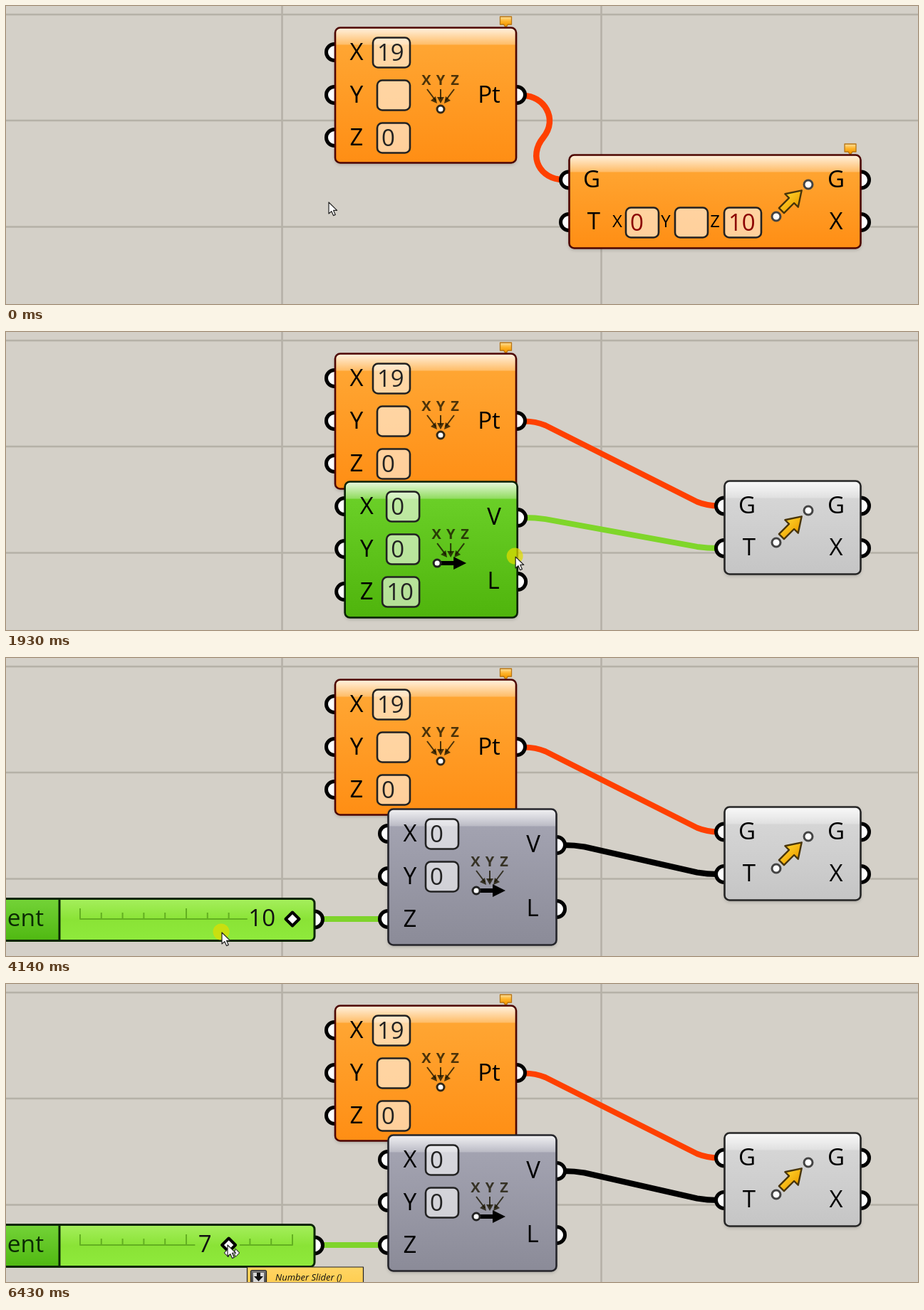
An HTML page with a canvas for the animation above (6500 ms loop, 1280 by 419 pixels).

```html
<!DOCTYPE html>
<html lang="en">
<head>
<meta charset="utf-8">
<title>Extracting a parameter into a slider</title>
<style>
html, body { margin: 0; width: 100%; height: 100%; overflow: hidden; background: #d4d0c8; }
canvas { display: block; }
</style>
</head>
<body>
<canvas id="stage" width="1280" height="419"></canvas>
<script>
const ctx = document.getElementById('stage').getContext('2d');
const LOOP = 6500, FONT = '"Open Sans", "Noto Sans", sans-serif';
const EXTRACT_VECTOR = 750, DRAG_VECTOR = [1440, 2130], EXTRACT_SLIDER = 3180,
      DRAG_SLIDER = [3600, 4200], DRAG_KNOB = [4750, 5900], TOOLTIP = 6430;

// Body gradient from top to bottom, then the outline
const SKINS = {
  warn:   ['#ffa937', '#ff8e14', '#4d0500'],
  green:  ['#6ed32b', '#4fb40c', '#082004'],
  grey:   ['#d9d9d9', '#c5c5c5', '#262626'],
  purple: ['#a6a6b4', '#8b8b98', '#25252b']
};

// Pointer path: time, x, y
const POINTER = [
  [0, 453, 276], [70, 453, 276], [620, 830, 303], [780, 830, 303], [1370, 580, 312],
  [1440, 580, 312], [1720, 600, 312], [2060, 770, 318], [2240, 770, 318], [2400, 577, 157],
  [2500, 577, 157], [3030, 566, 366], [3180, 560, 368], [3390, 485, 382], [3560, 467, 386],
  [3600, 467, 386], [4080, 303, 386], [4240, 303, 386], [4600, 403, 368], [4750, 403, 368],
  [5250, 215, 368], [5440, 255, 368], [5870, 311, 367], [6500, 311, 367]
];

const within = (t, [a, b]) => t >= a && t < b;

function pointerAt(t) {
  const i = POINTER.findIndex(k => k[0] > t);
  const [t0, x0, y0] = POINTER[i - 1], [t1, x1, y1] = POINTER[i];
  const p = (t - t0) / (t1 - t0), e = p * p * (3 - 2 * p);
  return { x: x0 + (x1 - x0) * e, y: y0 + (y1 - y0) * e };
}

function text(s, x, y, size = 33, color = '#000', align = 'center', style = '') {
  ctx.font = `${style} ${size}px ${FONT}`;
  ctx.textAlign = align;
  ctx.fillStyle = color;
  ctx.fillText(s, x, y);
}

function shade(y, h, ...colors) {
  const g = ctx.createLinearGradient(0, y, 0, y + h);
  colors.forEach((c, i) => g.addColorStop(i / (colors.length - 1), c));
  return g;
}

function stroke(path, color, width) {
  ctx.strokeStyle = color;
  ctx.lineWidth = width;
  ctx.lineJoin = 'round';
  ctx.stroke(path);
}

function rounded(x, y, w, h, r) {
  const p = new Path2D();
  p.roundRect(x, y, w, h, r);
  return p;
}

function dot(x, y, r, fill, line, width) {
  const p = new Path2D();
  p.arc(x, y, r, 0, 7);
  ctx.fillStyle = fill;
  ctx.fill(p);
  if (line) stroke(p, line, width);
}

const grip = (x, y) => dot(x, y, 11.5, '#fff', '#000', 5);

function body(x, y, w, h, skin) {
  const [top, bottom, line] = SKINS[skin], p = rounded(x, y, w, h, 7);
  ctx.save();
  ctx.shadowColor = 'rgba(0,0,0,.25)';
  ctx.shadowBlur = 5;
  ctx.shadowOffsetY = 2;
  ctx.fillStyle = shade(y, h, top, bottom);
  ctx.fill(p);
  ctx.restore();
  ctx.save();
  ctx.clip(p);
  ctx.fillStyle = shade(y, 24, 'rgba(255,255,255,.85)', 'rgba(255,255,255,.25)');
  ctx.fillRect(x, y, w, 24);
  ctx.restore();
  stroke(p, line, 2.6);
}

// Value box whose right edge is fixed
function valueBox(right, y, value, color = '#222') {
  const w = value.length > 1 ? 52 : 46, p = rounded(right - w, y - 21, w, 42, 7);
  ctx.fillStyle = 'rgba(255,255,255,.57)';
  ctx.fill(p);
  stroke(p, '#222', 2.6);
  text(value, right - w + 6, y + 11, 33, color, 'left');
}

function balloon(x, y) {
  const p = new Path2D(`M${x - 8} ${y - 7}h16v11h-5l-3 4l-3-4h-5z`);
  ctx.fillStyle = shade(y - 7, 12, '#ffe2a0', '#ffb52e', '#f59a00');
  ctx.fill(p);
  stroke(p, '#b87514', 1.3);
}

function xyzIcon(x, y, vector) {
  const ink = 'rgba(25,20,0,.78)';
  ['X', 'Y', 'Z'].forEach((c, i) => text(c, x + (i - 1) * 20, y + 7, 20, ink, 'center', 'bold'));
  stroke(new Path2D(`M${x - 19} ${y + 13}l12 16M${x} ${y + 13}v14M${x + 19} ${y + 13}l-12 16`), ink, 2);
  ctx.fillStyle = ink;
  ctx.fill(new Path2D(`M${x - 5} ${y + 33}l-9-4l7-6zM${x} ${y + 33}l-5-9h10zM${x + 5} ${y + 33}l9-4l-7-6z`));
  if (!vector) return dot(x, y + 41, 5, '#fff', '#332818', 3);
  ctx.fillStyle = '#000';
  ctx.fill(new Path2D(`M${x - 16} ${y + 38}h20v-6l18 9l-18 9v-6h-20z`));
  dot(x - 19, y + 41, 5, '#fff', '#222', 3);
}

function moveIcon() {
  ctx.save();
  ctx.translate(1087, 289);
  ctx.rotate(-Math.PI / 4);
  const p = new Path2D('M2-5h20v-8l20 13l-20 13v-8h-20z');
  ctx.fillStyle = shade(-12, 24, '#ffd12a', '#eda000');
  ctx.fill(p);
  stroke(p, '#49350b', 2.4);
  ctx.restore();
  dot(1081, 296, 6, '#fff', '#444', 3);
  dot(1126, 251, 6, '#fff', '#444', 3);
}

function wire(x0, y0, x1, y1, color) {
  const slope = (y1 - y0) / (x1 - x0), bend = 22 * slope;
  stroke(new Path2D(`M${x0} ${y0}Q${x0 + 16} ${y0} ${x0 + 30} ${y0 + bend * .6}` +
    `L${x1 - 30} ${y1 - bend * .6}Q${x1 - 16} ${y1} ${x1} ${y1}`), color, 8);
}

function pointComponent() {
  [65, 125, 185].forEach(y => grip(461, y));
  grip(717, 125);
  balloon(701.5, 22);
  body(462, 30.5, 254, 190, 'warn');
  ['X', 'Y', 'Z'].forEach((c, i) => {
    const y = 65 + i * 60;
    text(c, 492, y + 11);
    valueBox(567, y + .5, ['19', '', '0'][i]);
  });
  xyzIcon(610, 104, false);
  text('Pt', 678, 136);
}

function moveComponent(wide) {
  const x = wide ? 790 : 1008;
  [244.5, 304].forEach(y => { grip(x, y); grip(1200, y); });
  if (wide) balloon(1185, 201);
  body(x + .5, 209.5, 1199 - x, 131, wide ? 'warn' : 'grey');
  text('G', x + 32, 255);
  text('T', x + 35, 314);
  if (wide) {
    [['X', 858, 916, '0'], ['Y', 926, 985, ''], ['Z', 995, 1060, '10']].forEach(([c, cx, right, v]) => {
      text(c, cx, 311, 24);
      valueBox(right, 304.5, v, '#8b0000');
    });
  }
  moveIcon();
  text('G', 1165, 255);
  text('X', 1165, 314);
}

function vectorComponent(right, y, skin, linked) {
  const x = right - (linked ? 237 : 243);
  [35, 95, 155].forEach(d => grip(x, y + d));
  [51, 141].forEach(d => grip(right, y + d));
  body(x + .5, y + .5, right - x - 1, 191, skin);
  ['X', 'Y', 'Z'].forEach((c, i) => {
    const row = y + 35 + i * 60;
    text(c, x + 31, row + 10.5);
    if (i < 2 || !linked) valueBox(right - 138, row + .5, i < 2 ? '0' : '10');
  });
  xyzIcon(right - 94, y + 74, true);
  text('V', right - 33, y + 61);
  text('L', right - 34, y + 151);
}

function slider(right, value, selected, held) {
  const left = right - 613, split = right - 358, zero = right - 329, step = 29.8;
  const knob = zero + value * step, line = selected ? '#0a2605' : '#1c1c1c';
  grip(right, 367.5);
  const p = rounded(left, 338.5, 613, 59, 6);
  ctx.save();
  ctx.clip(p);
  ctx.fillStyle = selected ? shade(338, 60, '#74d338', '#4fb811') : shade(338, 60, '#b8b8c6', '#9292a2');
  ctx.fillRect(left, 338, 613, 60);
  ctx.fillStyle = selected ? shade(338, 60, '#a6ef5e', '#8ae336', '#8fea3c') : shade(338, 60, '#f0f0f0', '#d0d0d0', '#c8c8c8');
  ctx.fillRect(split, 338, 358, 60);
  ctx.restore();
  stroke(p, line, 3);
  stroke(new Path2D(`M${split} 338v60`), line, 3);
  text('Z component', right - 380, 377, 33.5, selected ? '#0b2a04' : '#111', 'right');

  // The scale leaves a gap around the number and the knob
  const gap = knob - (value > 9 ? 64 : 48), rule = new Path2D();
  if (gap > zero) rule.rect(zero, 367, gap - zero, .01);
  if (knob + 16 < zero + 10 * step) rule.rect(knob + 16, 367, zero + 10 * step - knob - 16, .01);
  for (let i = 0; i <= 10; i++) {
    const x = zero + i * step;
    if (x < gap || x > knob + 16) {
      rule.moveTo(x, 367);
      rule.lineTo(x, i % 5 ? 358 : 352);
    }
  }
  stroke(rule, selected ? '#63b021' : '#a3a3a3', 2);
  text(value, knob - 24, 377, 33, '#111', 'right');
  const diamond = new Path2D(`M${knob} 357.5l9.5 9.5l-9.5 9.5l-9.5-9.5z`);
  ctx.fillStyle = held ? '#e6d65c' : '#fff';
  ctx.fill(diamond);
  stroke(diamond, held ? '#4b3a00' : '#000', 4);
}

function sliderWire(right) {
  const color = '#7fd42c', overlap = right - 521;
  if (overlap <= 0) return stroke(new Path2D(`M${right + 10} 367H528`), color, 8);
  const r = overlap * .84;
  const loop = new Path2D();
  loop.arc(530, 367 + r * 1.13, r, 0, 7);
  stroke(loop, color, 8);
}

function tooltip() {
  const p = rounded(338.5, 398, 163, 40, 0);
  ctx.fillStyle = shade(398, 30, '#ffd564', '#ffcb4a');
  ctx.fill(p);
  stroke(p, '#222', 1.2);
  const icon = rounded(343.5, 402.5, 22, 22, 2);
  ctx.fillStyle = shade(402, 22, '#777', '#444');
  ctx.fill(icon);
  stroke(icon, '#222', 1.2);
  ctx.fillStyle = '#d8d8d8';
  ctx.fillRect(347, 406, 15, 14);
  ctx.fillStyle = '#111';
  ctx.fill(new Path2D('M352 406h5v5h4l-6.5 7l-6.5-7h4z'));
  text('Number Slider ()', 378, 417, 13, '#111', 'left', 'italic');
}

function pointer({ x, y }, pressed, sliding) {
  if (pressed && !sliding) dot(x - 1, y - 1, 11.5, 'rgba(225,220,0,.72)');
  ctx.save();
  ctx.translate(x, y);
  ctx.fillStyle = '#fff';
  if (sliding) {
    const arrows = new Path2D('M-4 11l5-5v3h10v-3l5 5l-5 5v-3h-10v3z');
    stroke(arrows, '#333', 2);
    ctx.fill(arrows);
  }
  const p = new Path2D('M0 0v16l3.8-3.4l2.7 6l2.8-1.2l-2.7-6h5z');
  ctx.fill(p);
  stroke(p, '#222', 1.2);
  ctx.restore();
}

function draw(t) {
  const at = pointerAt(t);
  const extracted = t >= EXTRACT_VECTOR, linked = t >= EXTRACT_SLIDER, picked = t >= DRAG_SLIDER[0];

  ctx.fillStyle = '#d4d0c8';
  ctx.fillRect(0, 0, 1280, 419);
  stroke(new Path2D('M387.5 0V419M835.5 0V419M0 12H1280M0 161H1280M0 310.5H1280'), 'rgba(70,65,50,.22)', 2.5);

  // The vector component follows the pointer while it is dragged
  const grab = pointerAt(Math.min(Math.max(t, DRAG_VECTOR[0]), DRAG_VECTOR[1]));
  const right = grab.x + 3, top = grab.y - 106;
  const sliderAt = pointerAt(Math.min(Math.max(t, DRAG_SLIDER[0]), DRAG_SLIDER[1]));
  const sliderRight = sliderAt.x + 130;

  if (extracted) {
    wire(727, 125.5, 1000, 244.5, '#ff4000');
    wire(right + 9, top + 51, 1000, 304, picked ? '#000' : '#7fd62a');
  } else {
    stroke(new Path2D('M726 126C754 126 776 158 754 185S750 244 782 244'), '#ff4000', 8.5);
  }
  if (linked) sliderWire(sliderRight);

  pointComponent();
  moveComponent(!extracted);
  if (extracted) vectorComponent(right, top, picked ? 'purple' : 'green', linked);

  const held = within(t, DRAG_KNOB);
  if (linked) {
    const x = pointerAt(Math.max(t, DRAG_KNOB[0])).x;
    slider(sliderRight, Math.min(10, Math.round((x - 106) / 29.8)), picked, held);
  }
  if (t >= TOOLTIP) tooltip();
  pointer(at, within(t, DRAG_VECTOR) || within(t, DRAG_SLIDER) || held, t >= 4600);
}

const start = performance.now();
function frame() {
  draw((performance.now() - start) % LOOP);
  requestAnimationFrame(frame);
}
frame();
</script>
</body>
</html>
```
